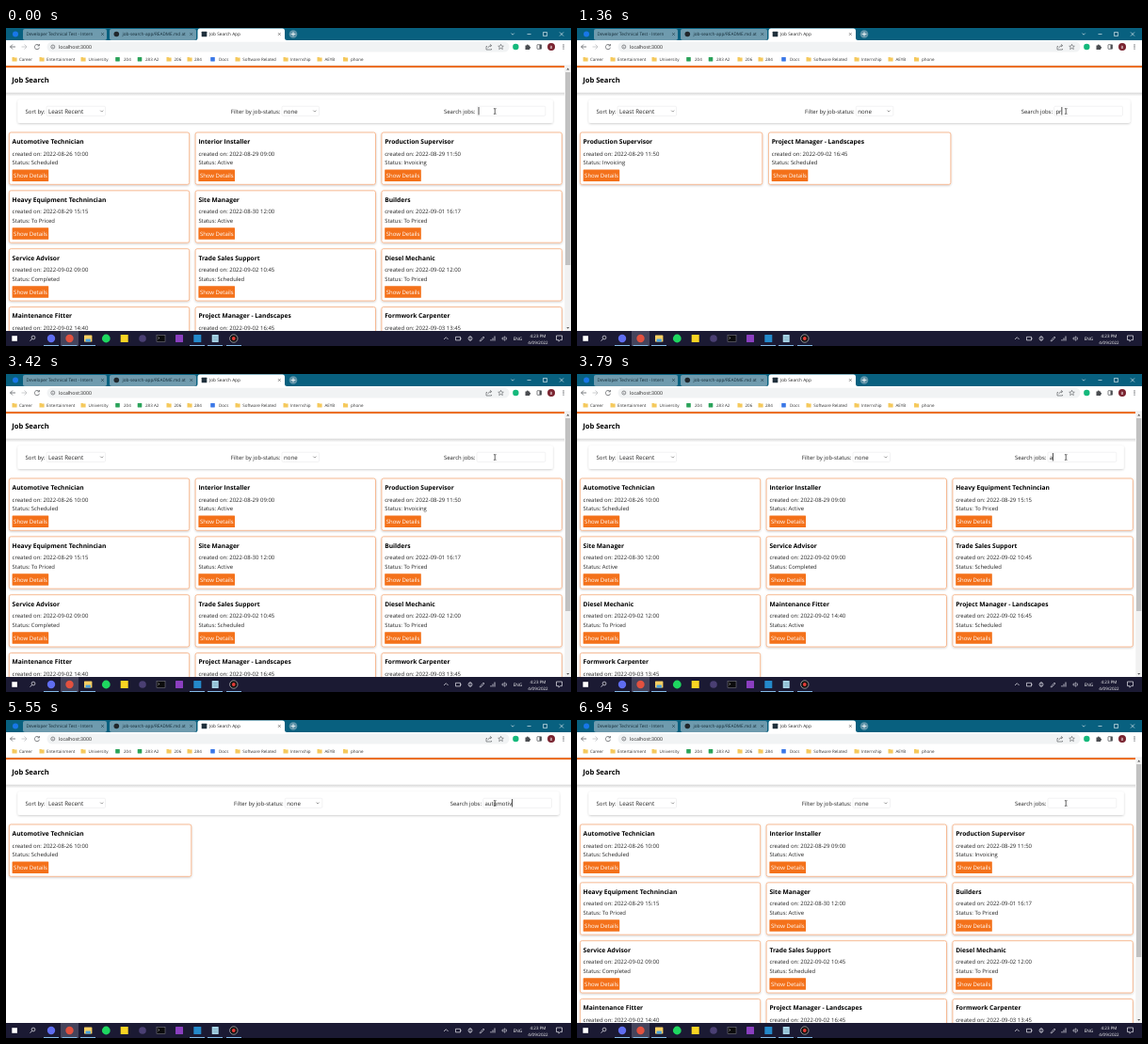
These frames come from a looping animation (600 by 338 pixels, 7030 ms). An HTML page:

```html
<!DOCTYPE html>
<html lang="en">
<head>
<meta charset="utf-8">
<title>Job Search App</title>
<style>
  html, body { margin: 0; width: 100%; height: 100%; overflow: hidden; background: #fff; }
  svg { display: block; width: 100vw; height: 100vh; }
  text { font-family: "Open Sans", "Noto Sans", sans-serif; text-rendering: geometricPrecision; white-space: pre; }
</style>
</head>
<body>
<svg id="stage" viewBox="0 0 600 338">
  <defs>
    <filter id="soft" x="-5%" y="-20%" width="110%" height="150%">
      <feDropShadow dx="0" dy="0.9" stdDeviation="1.1" flood-color="#000" flood-opacity=".2"/>
    </filter>
    <linearGradient id="fade" x2="0" y2="1">
      <stop offset="0" stop-color="#000" stop-opacity=".17"/>
      <stop offset="1" stop-color="#000" stop-opacity="0"/>
    </linearGradient>
    <clipPath id="tabText"><rect x="20" y="0" width="78" height="13"/><rect x="123" y="0" width="68" height="13"/></clipPath>
  </defs>
  <rect width="600" height="338" fill="#fff"/>
  <g id="page"></g>
  <rect id="caret" y="84" width=".8" height="8.4" fill="#222"/>
  <path d="M517.9 85.7H518.9L519.2 86L519.5 85.7H520.5M519.2 86V91M517.9 91.3H518.9L519.2 91L519.5 91.3H520.5" fill="none" stroke="#222" stroke-width=".7"/>
  <g id="browser"></g>
  <g id="taskbar"></g>
</svg>
<script>
const LOOP = 7030;
const $ = id => document.getElementById(id);

const jobs = [
  ["Automotive Technician", "2022-08-26 10:00", "Scheduled"],
  ["Interior Installer", "2022-08-29 09:00", "Active"],
  ["Production Supervisor", "2022-08-29 11:50", "Invoicing"],
  ["Heavy Equipment Technincian", "2022-08-29 15:15", "To Priced"],
  ["Site Manager", "2022-08-30 12:00", "Active"],
  ["Builders", "2022-09-01 16:17", "To Priced"],
  ["Service Advisor", "2022-09-02 09:00", "Completed"],
  ["Trade Sales Support", "2022-09-02 10:45", "Scheduled"],
  ["Diesel Mechanic", "2022-09-02 12:00", "To Priced"],
  ["Maintenance Fitter", "2022-09-02 14:40", "Active"],
  ["Project Manager - Landscapes", "2022-09-02 16:45", "Scheduled"],
  ["Formwork Carpenter", "2022-09-03 13:45", "Active"]
];

// [time, contents of the search box]
const typing = [
  [-170, ""], [1190, "p"], [1320, "pr"], [1460, "pro"], [2790, "pr"], [2970, ""],
  [3700, "a"], [3880, "au"], [4060, "aut"], [4210, "auto"], [4480, "autom"],
  [4610, "automo"], [4790, "automot"], [4900, "automoti"], [5000, "automotiv"],
  [5150, "automotive"], [5550, "automotiv"]
];
for (let n = 8; n >= 0; n--) typing.push([6030 + (8 - n) * 38, "automotive".slice(0, n)]);

const text = (x, y, s, size, fill = "#222", more = "") =>
  `<text x="${x}" y="${y}" font-size="${size}" fill="${fill}" ${more}>${s}</text>`;
const box = (x, y, w, h, fill, r = 0, more = "") =>
  `<rect x="${x}" y="${y}" width="${w}" height="${h}" rx="${r}" fill="${fill}" ${more}/>`;
const dot = (x, y, r, fill, more = "") => `<circle cx="${x}" cy="${y}" r="${r}" fill="${fill}" ${more}/>`;
const line = (d, color, w = .7, more = "") =>
  `<path d="${d}" fill="none" stroke="${color}" stroke-width="${w}" ${more}/>`;
const cross = (x, y, r, color) =>
  line(`M${x - r} ${y - r}l${2 * r} ${2 * r}M${x + r} ${y - r}l${-2 * r} ${2 * r}`, color, .6);
const chevron = (x, y) => line(`M${x - 1.5} ${y - .8}l1.5 1.5l1.5 -1.5`, "#555", .6);
const field = (x, w) => box(x, 83.2, w, 10.2, "#fff", 1.2, 'stroke="#e4e4e7" stroke-width=".5"');

function card([title, date, status], x, y, w) {
  const tx = x + 3.3;
  return box(x, y, w, 55.3, "#fff", 2, 'stroke="#f7ab7c" stroke-width=".8" filter="url(#soft)"') +
    text(tx, y + 11.8, title, 6.63, "#000", 'font-weight="700"') +
    text(tx, y + 24.5, "created on: " + date, 5.98) +
    text(tx, y + 34, "Status: " + status, 5.9) +
    box(tx, y + 39.5, 38.6, 12.5, "#f4711a", .5) +
    text(tx + 1.5, y + 48.1, "Show Details", 6, "#fff");
}

let inputX = 500;
function drawPage(query) {
  const found = jobs.filter(j => j[0].toLowerCase().includes(query));
  const scroll = found.length > 9;
  const width = scroll ? 593 : 600;
  const mid = scroll ? 0 : 3.3, right = scroll ? 0 : 6.7;
  const pitch = scroll ? 197.8 : 200.1;
  inputX = 500 + right;
  let s = box(0, 68.5, width, 4, "url(#fade)") + box(0, 41, width, 27.5, "#fff") +
    box(0, 40, width, 2.1, "#ec6a1c") +
    text(6.2, 57.6, "Job Search", 7.6, "#000", 'font-weight="700"') +
    box(12.4, 76, 568.4 + right, 25, "#fff", 2.5, 'filter="url(#soft)"') +
    text(20.6, 90.6, "Sort by:", 5.98) + field(43, 62.5) +
    text(45, 90.6, "Least Recent", 6.3) + chevron(101.7, 88.4) +
    text(238.8 + mid, 90.6, "Filter by job-status:", 5.95) + field(293 + mid, 39.5) +
    text(295 + mid, 90.6, "none", 6.1) + chevron(327.8 + mid, 88.4) +
    text(465 + right, 90.6, "Search jobs:", 5.95) + field(inputX, 72.8) +
    text(inputX + 1.7, 90.6, query, 6.04, "#222", 'id="query"');
  found.forEach((job, i) => {
    s += card(job, 3.3 + i % 3 * pitch, 111 + Math.floor(i / 3) * 61.85, scroll ? 191.4 : 193.5);
  });
  if (scroll) {
    s += box(593.3, 40, 6.7, 282, "#f1f1f1") + box(594, 47, 5.3, 205, "#c1c1c1") +
      '<path d="M595.2 44.4l1.5 -1.8l1.5 1.8zM595.2 318l1.5 1.8l1.5 -1.8z" fill="#555"/>';
  }
  $("page").innerHTML = s;
}

function drawBrowser() {
  const ink = "#4a4d51";
  let s = box(0, 0, 600, 13, "#08607f") + box(18, 1, 89, 12, "#6f9bae", 2) + box(110, 1, 92, 12, "#6f9bae", 2) +
    '<path d="M201 13q2.5 0 2.5 -2.5V3q0 -2.5 2.5 -2.5H293.500q2.500 0 2.500 2.500V10.500q0 2.500 2.500 2.500z" fill="#fff"/>' +
    dot(10, 6.5, 3, "#1877e8") + dot(24.6 - 9.1 + 1.8 + 6.7 - 5.5, 6.5, 0, "none") +
    '<g clip-path="url(#tabText)">' +
    text(21.5, 8.2, "Developer Technical Test - Intern", 4.7, "#142a35") +
    text(123.6, 8.2, "job-search-app/README.md at main", 4.7, "#142a35") + "</g>" +
    dot(117.3, 6.5, 2.8, "#20262b") +
    box(207.7, 3.7, 5.6, 5.6, "#20303c", .5) + text(216, 8.2, "Job Search App", 4.7) +
    cross(102.5, 6.5, 1.3, "#17313d") + cross(196.7, 6.5, 1.3, "#17313d") + cross(290.3, 6.5, 1.3, "#444") +
    dot(305, 6.5, 4.3, "#5f93a8") + line("M302.700 6.500h4.600M305 4.200v4.600", "#fff", .8) +
    line("M536.500 5.600l1.600 1.600l1.600 -1.600M553.500 6.500h4M570.500 4.500h4v4h-4z", "#fff", .6) +
    cross(590, 6.5, 2, "#fff");

  s += box(0, 13, 600, 27, "#fff") + box(43.5, 14.7, 491, 10.8, "#f1f3f4", 5.4) +
    line("M10 20H4.500M7 17.500L4.500 20L7 22.500", ink) + line("M16.500 20H22M19.500 17.500L22 20L19.500 22.500", "#b6b8ba") +
    line("M35 18.500a2.600 2.600 0 1 0 .5 2.200M35.400 17v1.900h-1.900", ink) +
    dot(49.8, 20, 2, "none", `stroke="${ink}" stroke-width=".6"`) + line("M49.800 19.700v1.400M49.800 18.700v.5", ink, .5) +
    text(56, 21.9, "localhost:3000", 5.2) +
    line("M511 19.500h-1v3.500h5.500v-1M511.800 21.200q.5 -2.500 3.500 -2.500M514 17.300l1.700 1.400l-1.700 1.400", ink, .6) +
    line("M525.500 17.300l.8 1.800l2 .2l-1.500 1.300l.5 2l-1.800 -1.100l-1.800 1.100l.5 -2l-1.500 -1.300l2 -.2z", ink, .55) +
    dot(541.3, 20, 3.2, "#15b97c") +
    `<path d="M551.500 18.500h1.300a1 1 0 0 1 2 0h1.300v1.300a1 1 0 0 1 0 2v1.200h-4.600z" fill="${ink}"/>` +
    box(564, 17.7, 4.6, 4.6, "none", .4, `stroke="${ink}" stroke-width=".7"`) + box(566.5, 18, 2, 4, ink) +
    dot(579, 20, 4, "#7a2430") + text(579, 21.6, "B", 4.4, "#fff", 'text-anchor="middle"') +
    [17.9, 20, 22.1].map(y => dot(592, y, .65, ink)).join("");

  const folder = x => `<path d="M${x - 2.5} 30.900h2l.7 .7h2.400v3.900h-5.100z" fill="#f5c95c"/>`;
  const marks = [
    [9, 14, "Career"], [38, 43, "Entertainment"], [82, 87.5, "University"],
    [118.5, 125, "204", "#2ba35a"], [142, 148, "283 A2", "#2ba35a"], [173, 178.500, "206"], [195, 200, "284"],
    [219.5, 226, "Docs", "#3b78e7"], [246, 251.3, "Software Related"], [297, 302, "Internship"],
    [333, 338.500, "AEYB"], [360.5, 366, "phone"]
  ];
  for (const [x, tx, name, color] of marks) {
    s += (color ? box(x - 2.3, 30.9, 4.6, 4.6, color, .4) : folder(x)) + text(tx, 34.8, name, 4.5, "#333");
  }
  s += line("M0 39.700H600", "#e3e5e8", .5);
  // page icon of the first tab
  s += dot(24.6, 6.5, 0, "none") + dot(18.8 + .4, 6.5, 0, "none");
  $("browser").innerHTML = s;
}

function drawTaskbar() {
  const pale = "#e8e8f0";
  let s = box(0, 322, 600, 16, "#1b1a33") + box(58, 322, 19, 16, "#45445c") +
    box(6.3, 327.2, 5.6, 5.6, "#fff") +
    dot(29, 329, 1.9, "none", `stroke="${pale}" stroke-width=".7"`) + line("M27.600 330.500l-2 2.100", pale, .8) +
    dot(48, 330, 4.2, "#5f6df0") + dot(67.5, 330, 4.2, "#e2513f") +
    box(83, 326.5, 8.4, 7, "#f7cf62", .6) + box(84.5, 330.5, 5.4, 3, "#4aa3df", .3) +
    dot(106.3, 330, 4.4, "#1ed760") + box(121.7, 326, 8, 8, "#f9d423") +
    dot(145, 330, 3.8, "#4a3f73") +
    box(160, 326.3, 9, 7.4, "#0b0b0d", 0, 'stroke="#8a8a92" stroke-width=".5"') +
    line("M161.500 328.500l1.300 1l-1.300 1", "#fff", .5) +
    box(180, 326, 8, 8, "#8b3fc0", .5) + box(199.3, 326, 8, 8, "#2489ca", .5) +
    box(218.7, 326, 7, 8, "#a9d5e8", .5) + line("M220 328.500h4.500M220 330.300h4.500M220 332h4.500", "#4d7f96", .4) +
    dot(241.8, 330, 4.2, "#111", 'stroke="#ddd" stroke-width=".6"') + dot(241.8, 330, 1.9, "#e33b36");
  for (const x of [48, 67.5, 87, 203, 222, 242]) s += box(x - 8, 337, 16, 1, "#83b9e6");
  s += line("M465 331l2.300 -2.300l2.300 2.300", pale) +
    line("M477.500 328.300h5v3.600h-5zM483 329.300v1.600", pale, .7) +
    dot(493, 330, 2, "none", `stroke="${pale}" stroke-width=".7"`) + line("M493 327v6", pale, .5) +
    line("M503 332.500l4 -4.500l1 1l-4 4z", pale, .6) +
    line("M515 332.500v-1.500M517 332.500v-3M519 332.500v-5", pale, .8) +
    line("M527 329.200h1.300l1.500 -1.400v4.500l-1.500 -1.400h-1.300zM531 328.500q1.300 1.500 0 3", pale, .6) +
    text(538.7, 331.8, "ENG", 4.7, "#fff") +
    text(565, 328.6, "4:23 PM", 4.5, "#fff", 'text-anchor="middle"') +
    text(565, 335.6, "4/09/2022", 4.5, "#fff", 'text-anchor="middle"') +
    line("M584.500 327h6v4.600h-2l-1.500 1.600v-1.600h-2.500z", pale, .7);
  $("taskbar").innerHTML = s;
}

let shown = null;
function render(t) {
  let at = 0, query = "";
  for (const [time, value] of typing) if (t >= time) [at, query] = [time, value];
  if (query !== shown) {
    drawPage(query);
    shown = query;
    const w = query ? $("query").getComputedTextLength() : 0;
    $("caret").setAttribute("x", inputX + 1.6 + w);
  }
  $("caret").setAttribute("visibility", (t - at) % 960 < 450 ? "visible" : "hidden");
}

drawBrowser();
drawTaskbar();
const start = performance.now();
function tick() {
  render((performance.now() - start) % LOOP);
  requestAnimationFrame(tick);
}
render(0);
requestAnimationFrame(tick);
</script>
</body>
</html>
```
